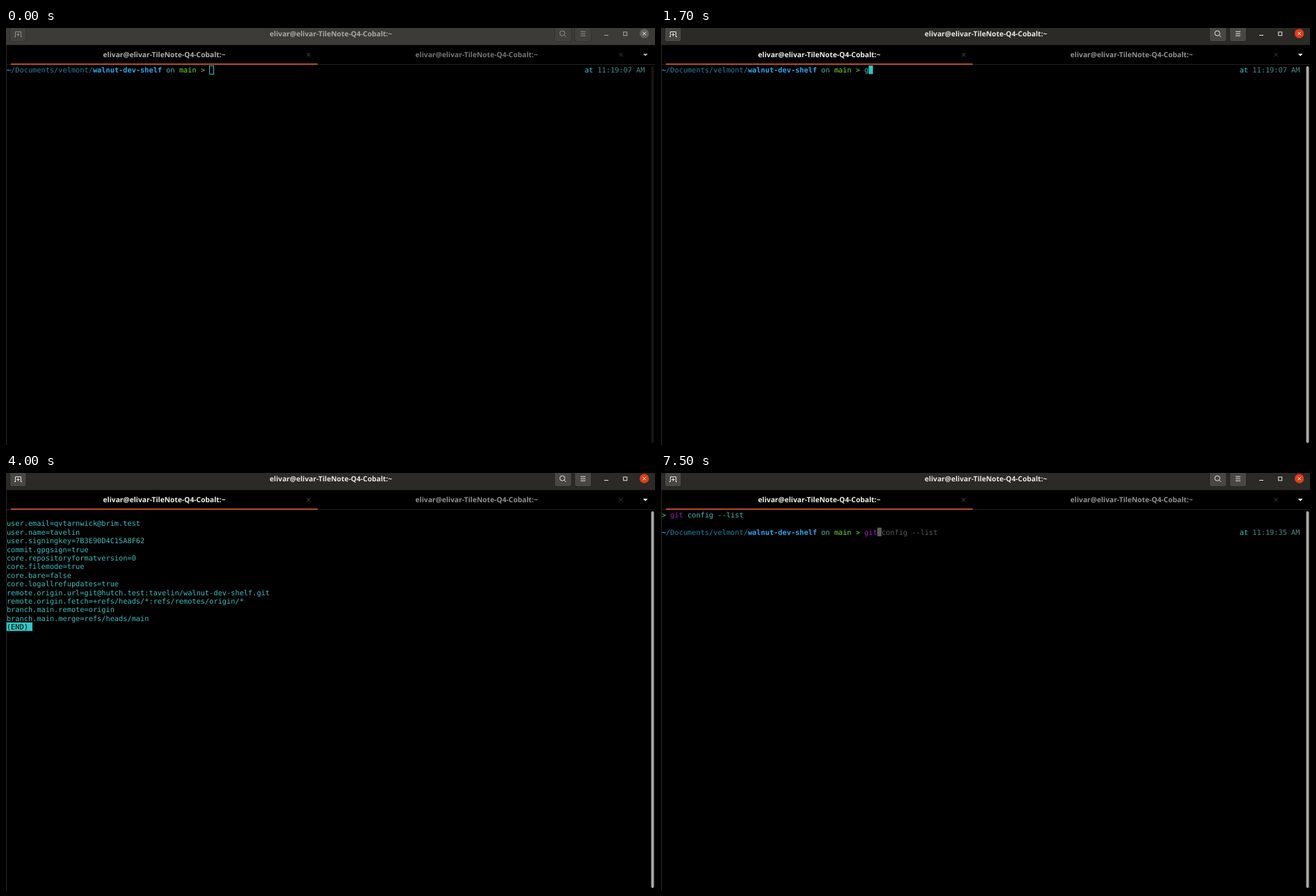
These frames come from a looping animation (933 by 600 pixels, 8000 ms). An HTML page:

```html
<!DOCTYPE html>
<html lang="en">
<head>
<meta charset="utf-8">
<title>Terminal</title>
<style>
html, body { margin: 0; width: 100%; height: 100%; overflow: hidden; background: #000; }
svg { display: block; width: 100vw; height: 100vh; }
text { white-space: pre; text-rendering: geometricPrecision; }
.ui { font: bold 10.25px "Noto Sans", "Open Sans", sans-serif; text-anchor: middle; }
#screen { font: 10.3px "DejaVu Sans Mono", monospace; }
.line { fill: none; stroke-width: 1; }
</style>
</head>
<body>
<svg id="stage" viewBox="0 0 933 600" preserveAspectRatio="none">
  <rect width="933" height="600"/>
  <rect id="header" width="933" height="24.5"/>
  <g id="buttons">
    <rect x="5.5" y="-4" width="23.5" height="23.5" rx="3"/>
    <rect x="788.5" y="-4" width="24.5" height="23.5" rx="3"/>
    <rect x="817.5" y="-4" width="24" height="23.5" rx="3"/>
  </g>
  <g id="icons" class="line">
    <path d="M13.5 12.5V5.5H21.5V12.5M12 12.5H14M21 12.5H23M17.5 7.2V11.8M15.2 9.5H19.8"/>
    <circle cx="799.8" cy="7.6" r="3.6"/>
    <path d="M802.5 10.3L805 12.8M826 5.2H833M826 8.2H833M826 11.2H833"/>
  </g>
  <g id="controls" class="line">
    <path d="M860 10.5H866"/>
    <rect x="887.7" y="5.8" width="5" height="5"/>
  </g>
  <circle id="close" cx="917.6" cy="8" r="6.7"/>
  <path d="M915.3 5.7L919.9 10.3M919.9 5.7L915.3 10.3" class="line" stroke="#f4f4f2" stroke-width="1.2"/>
  <text id="title" class="ui" x="467" y="12"/>
  <text id="tab1" class="ui" x="227.5" y="42"/>
  <text id="tab2" class="ui" x="676.5" y="42"/>
  <path d="M432.3 35.8L437.7 41.2M437.7 35.8L432.3 41.2" class="line" stroke="#505050"/>
  <path d="M881.3 35.8L886.7 41.2M886.7 35.8L881.3 41.2" class="line" stroke="#3c3c3c"/>
  <path id="arrow" d="M915.8 37H922.6L919.2 40.6Z"/>
  <path d="M0 52.5H933" stroke="#1f1f1e"/>
  <path d="M7 52H448" stroke="#b5492f" stroke-width="2"/>
  <path d="M.5 24V600" stroke="#2a2a29"/>
  <rect id="bar" x="927.5" y="55" width="4" height="542" rx="2"/>
  <g id="screen"></g>
  <g id="mouse" fill="none">
    <path d="M351.8 155.3H353.4L354.4 156L355.4 155.3H357M354.4 156V164.3M351.8 165H353.4L354.4 164.3L355.4 165H357" stroke="#fff" stroke-width="2.4"/>
    <path d="M352.2 155.3H353.4L354.4 156L355.4 155.3H356.6M354.4 156V164.3M352.2 165H353.4L354.4 164.3L355.4 165H356.6" stroke="#222" stroke-width=".8"/>
  </g>
</svg>
<script>
const LOOP = 8000, CELL = 6.2, ROW = 12.39, LEFT = .9, TOP = 53.9;
const C = {
  teal: '#41bcbc', cursor: '#36c3c4', dir: '#2380a9', repo: '#2ba8ed', green: '#66da3e',
  time: '#4d8889', git: '#a21cba', hint: '#5a5c58'
};
const HOST = 'elivar@elivar-TileNote-Q4-Cobalt:~';
const REPO = 'walnut-dev-shelf';
const COMMAND = 'git config --list';
const CONFIG = [
  'user.email=qvtarnwick@brim.test',
  'user.name=tavelin',
  'user.signingkey=7B3E90D4C15A8F62',
  'commit.gpgsign=true',
  'core.repositoryformatversion=0',
  'core.filemode=true',
  'core.bare=false',
  'core.logallrefupdates=true',
  `remote.origin.url=git@hutch.test:tavelin/${REPO}.git`,
  'remote.origin.fetch=+refs/heads/*:refs/remotes/origin/*',
  'branch.main.remote=origin',
  'branch.main.merge=refs/heads/main'
];

// [start, typed characters, suggestion shown, cursor visible]
const FIRST = [
  [0, 0, false, true], [1500, 0, false, false], [1700, 1, false, true],
  [1900, 3, true, true], [2000, 4, true, true], [2600, 4, true, false],
  [2900, 4, true, true], [3000, 5, true, true], [3100, 6, true, true],
  [3700, 17, false, true]
];
const SECOND = [
  [5800, 0, false, true], [6300, 0, false, false], [6900, 0, false, true],
  [7300, 1, true, true], [7500, 3, true, true]
];

const $ = id => document.getElementById(id);
const paint = (id, color, attr = 'fill') => $(id).setAttribute(attr, color);
const at = (steps, t) => steps.filter(s => s[0] <= t).pop();
const escapeText = s => s.replace(/&/g, '&amp;').replace(/</g, '&lt;').replace(/>/g, '&gt;');
const colX = col => LEFT + col * CELL;
const rowY = row => TOP + row * ROW;
const mix = (a, b, p) => `rgb(${a.map((v, i) => Math.round(v + (b[i] - v) * p))})`;

function put(row, col, str, color, bold) {
  return str && `<text x="${colX(col).toFixed(2)}" y="${(rowY(row) + 10.1).toFixed(2)}" fill="${color}"` +
    `${bold ? ' font-weight="bold"' : ''}>${escapeText(str)}</text>`;
}

function block(row, col, count, color) {
  return `<rect x="${colX(col)}" y="${rowY(row)}" width="${count * CELL}" height="${ROW}" fill="${color}"/>`;
}

function prompt(row, clock) {
  return put(row, 0, '~', C.repo, true) + put(row, 1, '/Documents/velmont/', C.dir) +
    put(row, 20, REPO, C.repo, true) + put(row, 37, 'on', C.teal) +
    put(row, 40, 'main >', C.green) + put(row, 134, 'at', C.cursor) +
    put(row, 137, clock, C.time);
}

function command(row, col, typed) {
  const known = typed.length >= 3;
  return put(row, col, typed.slice(0, 3), known ? C.git : C.teal) +
    put(row, col + 4, typed.slice(4), C.teal);
}

function input(row, [, count, hint, shown], focused) {
  const col = 47 + count;
  let out = command(row, 47, COMMAND.slice(0, count));
  if (hint) out += put(row, col, COMMAND.slice(count), C.hint);
  if (!focused) {
    out += `<rect x="${colX(col) + .3}" y="${rowY(row) + .5}" width="6" height="12" fill="none" stroke="${C.cursor}"/>`;
  } else if (shown) {
    out += block(row, col, 1, hint ? C.hint : C.cursor);
    if (hint) out += put(row, col, COMMAND[count].trim(), '#000');
  }
  return out;
}

function pager(t) {
  const shown = t < 4700 || t >= 5100;
  return CONFIG.map((s, i) => put(i + 1, 0, s, C.teal)).join('') +
    block(13, 0, shown ? 6 : 5, C.cursor) + put(13, 0, '(END)', '#000');
}

function screen(t) {
  if (t < 4000) return prompt(0, '11:19:07 AM') + input(0, at(FIRST, t), t >= 900);
  if (t < 5800) return pager(t);
  return put(0, 0, '>', C.green) + command(0, 2, COMMAND) +
    prompt(2, '11:19:35 AM') + input(2, at(SECOND, t), true);
}

function chrome(t) {
  const on = t >= 900;
  const p = on ? Math.min(1, (Math.floor(t / 100) - 9) / 3) : 0;
  paint('header', on ? '#2b2a26' : '#3c3b37');
  paint('buttons', on ? mix([58, 57, 53], [72, 71, 67], p) : '#42413d');
  paint('buttons', on ? '#24231f' : '#31302d', 'stroke');
  paint('icons', mix([145, 144, 140], [232, 231, 227], p), 'stroke');
  paint('controls', on ? '#e8e7e3' : '#a9a8a4', 'stroke');
  paint('close', on ? '#db3d17' : '#62615d');
  paint('title', on ? '#e8e7e3' : '#a9a8a4');
  paint('tab1', on ? '#f2f2f0' : '#b0b0ae');
  paint('tab2', on ? '#92918f' : '#777674');
  paint('arrow', on ? '#f2f2f0' : '#b0b0ae');
  paint('bar', on ? '#aaa9a6' : '#151514');
  $('mouse').style.display = on && t < 1700 ? '' : 'none';
}

let last = '';
function render(t) {
  chrome(t);
  const markup = screen(t);
  if (markup !== last) $('screen').innerHTML = last = markup;
}

for (const id of ['title', 'tab1', 'tab2']) $(id).textContent = HOST;
const start = performance.now();
function tick() {
  render((performance.now() - start) % LOOP);
  requestAnimationFrame(tick);
}
tick();
</script>
</body>
</html>
```
